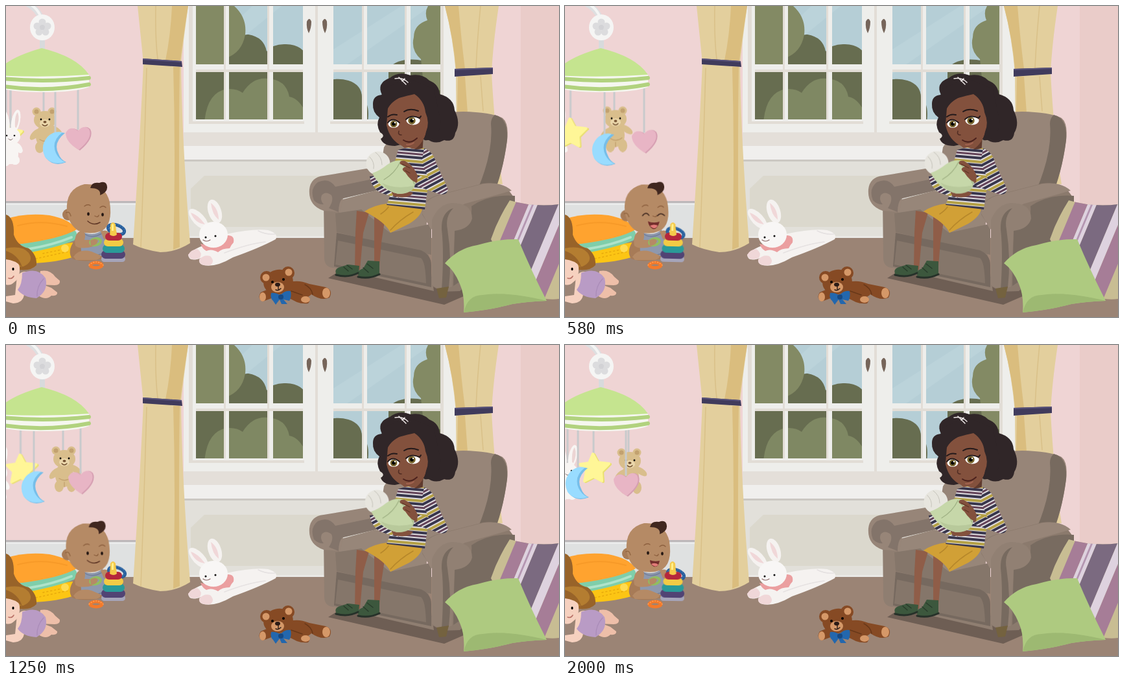
These frames come from a looping animation (853 px wide and 480 px high, 2.08 s). An HTML page:

```html
<!DOCTYPE html>
<html lang="en">
<head>
<meta charset="utf-8">
<title>Nursery</title>
<style>
html, body { margin: 0; width: 100%; height: 100%; overflow: hidden; background: #efd4d4; }
svg { display: block; width: 100vw; height: 100vh; }
.line { fill: none; stroke-linecap: round; stroke-linejoin: round; }
.string { stroke: #c8cacc; stroke-width: 3; }

/* 25 poses per loop: each span is stepped, not smooth */
.move { animation: 2080ms linear -4ms infinite; }
.show { animation: 2080ms step-end -4ms infinite; }

.heart { animation-name: heart; }
.bear { animation-name: bear; }
.moon { animation-name: moon; }
.star { animation-name: star; }
.bunny { animation-name: bunny; }
.ring { animation-name: ring; }
.stack { animation-name: stack; transform-origin: 166px 392px; }
.head { animation-name: head; transform-origin: 124px 350px; }
.bundle { animation-name: bundle; }
.smile { animation-name: smile; }
.open { animation-name: open; }
.laugh { animation-name: laugh; }
.near { animation-name: near; }

@keyframes heart {
  0% { transform: translate(112px, 204px); animation-timing-function: steps(4); }
  16% { transform: translate(118px, 207px); animation-timing-function: steps(6); }
  40% { transform: translate(128px, 210px); animation-timing-function: steps(3); }
  52% { transform: translate(121px, 211px); animation-timing-function: steps(4); }
  68% { transform: translate(111px, 212px); animation-timing-function: steps(3); }
  80% { transform: translate(104px, 213px); animation-timing-function: steps(4); }
  96%, 100% { transform: translate(95px, 215px); }
}
@keyframes bear {
  0% { transform: translate(60px, 176px); animation-timing-function: steps(4); }
  16% { transform: translate(71px, 175px); animation-timing-function: steps(6); }
  40% { transform: translate(85px, 174px); animation-timing-function: steps(3); }
  52% { transform: translate(88px, 175px); animation-timing-function: steps(4); }
  68% { transform: translate(92px, 177px); animation-timing-function: steps(3); }
  80% { transform: translate(96px, 178px); animation-timing-function: steps(4); }
  96%, 100% { transform: translate(100px, 179px); }
}
@keyframes moon {
  0% { transform: translate(74px, 218px); animation-timing-function: steps(4); }
  16% { transform: translate(66px, 220px); animation-timing-function: steps(6); }
  40% { transform: translate(52px, 221px); animation-timing-function: steps(3); }
  52% { transform: translate(46px, 220px); animation-timing-function: steps(4); }
  68% { transform: translate(36px, 217px); animation-timing-function: steps(3); }
  80% { transform: translate(29px, 215px); animation-timing-function: steps(4); }
  96%, 100% { transform: translate(18px, 212px); }
}
@keyframes star {
  0% { transform: translate(2px, 199px); animation-timing-function: steps(4); }
  16% { transform: translate(7px, 198px); animation-timing-function: steps(6); }
  40% { transform: translate(14px, 192px); animation-timing-function: steps(3); }
  52% { transform: translate(20px, 191px); animation-timing-function: steps(4); }
  68% { transform: translate(29px, 190px); animation-timing-function: steps(3); }
  80% { transform: translate(37px, 189px); animation-timing-function: steps(4); }
  96%, 100% { transform: translate(46px, 189px); }
}
@keyframes bunny {
  0% { transform: translate(7px, 201px); animation-timing-function: steps(4); }
  16% { transform: translate(-1px, 201px); animation-timing-function: steps(6); }
  40% { transform: translate(-28px, 199px); animation-timing-function: steps(3); }
  52% { transform: translate(-17px, 198px); animation-timing-function: steps(4); }
  68% { transform: translate(-9px, 197px); animation-timing-function: steps(3); }
  80% { transform: translate(-4px, 197px); animation-timing-function: steps(4); }
  96%, 100% { transform: translate(4px, 195px); }
}
@keyframes ring {
  0% { transform: translate(170px, 345px); animation-timing-function: steps(4); }
  16% { transform: translate(170px, 348px); animation-timing-function: steps(6); }
  40%, 52% { transform: translate(171px, 353px); animation-timing-function: steps(4); }
  68% { transform: translate(171px, 348px); animation-timing-function: steps(3); }
  80% { transform: translate(167px, 330px); animation-timing-function: steps(4); }
  96%, 100% { transform: translate(171px, 354px); }
}
@keyframes stack {
  0% { transform: none; animation-timing-function: steps(4); }
  16% { transform: rotate(6deg); animation-timing-function: steps(4); }
  32%, 88% { transform: none; animation-timing-function: steps(2); }
  96%, 100% { transform: rotate(1deg); }
}
@keyframes head {
  0%, 16% { transform: none; animation-timing-function: steps(6); }
  40%, 52% { transform: translate(-1px, 1px) rotate(-4deg); animation-timing-function: steps(4); }
  68% { transform: translate(1px, 0); animation-timing-function: steps(3); }
  80% { transform: translate(-1px, 0); animation-timing-function: steps(4); }
  96%, 100% { transform: translate(1px, 0); }
}
@keyframes bundle {
  0% { transform: none; animation-timing-function: steps(17); }
  68%, 100% { transform: translate(-2px, -1px); }
}
@keyframes smile { 0%, 60% { visibility: visible; } 12%, 88%, 100% { visibility: hidden; } }
@keyframes open { 0%, 24% { visibility: hidden; } 12%, 88%, 100% { visibility: visible; } }
@keyframes laugh { 0%, 60%, 100% { visibility: hidden; } 24% { visibility: visible; } }
@keyframes near { 0% { visibility: visible; } 12%, 100% { visibility: hidden; } }
</style>
</head>
<body>
<svg viewBox="0 0 853 480" preserveAspectRatio="none">
<defs>
  <clipPath id="panes"><path d="M293 0h43v90h-43zM344 0h59v90h-59zM412 0h46v90h-46zM293 102h43v73h-43zM344 102h59v73h-59zM412 102h46v73h-46zM505 0h44v90h-44zM557 0h58v90h-58zM624 0h46v90h-46zM505 102h44v73h-44zM557 102h58v73h-58zM624 102h46v73h-46z"/></clipPath>
  <clipPath id="cushion"><path d="M777 300Q815 311 853 306V452Q830 456 790 440L748 360Q758 330 777 300Z"/></clipPath>
  <pattern id="knit" width="40" height="22" patternUnits="userSpaceOnUse" patternTransform="rotate(5)">
    <path fill="#e0dde0" d="M0 0h40v22H0z"/>
    <path fill="#38364c" d="M0 0h40v4H0zM0 11h40v4H0z"/>
    <path fill="#b5a145" d="M0 6h40v4H0z"/>
    <path fill="#634358" d="M0 17h40v3H0z"/>
  </pattern>
  <pattern id="sleeve" href="#knit" patternTransform="rotate(-28)"/>
  <path id="points" stroke-width="4" stroke-linejoin="round" d="M-3-21L4-8L22-6L10 6L11 21L-2 14L-16 21L-13 5L-23-5L-9-7Z"/>
  <g id="rabbit">
    <path class="string" d="M0-78V-12"/>
    <g fill="#f8f5f3">
      <ellipse cx="-8" cy="-23" rx="6" ry="18" transform="rotate(-10 -8 -23)"/>
      <ellipse cx="8" cy="-23" rx="6.5" ry="18" transform="rotate(12 8 -23)"/>
      <ellipse cy="26" rx="12" ry="17"/>
      <ellipse cx="-7" cy="38" rx="6" ry="8"/><ellipse cx="7" cy="37" rx="7" ry="7"/>
      <ellipse cx="12" cy="18" rx="5" ry="9" transform="rotate(-35 12 18)"/>
      <ellipse rx="15" ry="13"/>
    </g>
    <path fill="#ecd5d4" d="M7-14Q6-32 11-37Q15-26 9-13Z"/>
    <circle cx="-6" cy="-1" r="1.3"/><circle cx="6" cy="-1" r="1.3"/>
    <path class="line" stroke="#806a68" d="M-3 4Q0 8 3 4"/>
  </g>
</defs>

<!-- walls and floor -->
<path fill="#efd4d4" d="M0 0h853v480H0z"/>
<path fill="#eaccc9" d="M794 0h59v330h-59z"/>
<path fill="#dfe1e1" d="M0 303h280v56H0z"/>
<path fill="#eceded" d="M0 305h200v2H0z"/>
<path fill="#bdb8ba" d="M0 301h200v3H0z"/>
<path fill="#e2e0da" d="M274 238h330v122H274z"/>
<path fill="#dbd8cd" d="M306 262H490V341H302L285 328V282Z"/>
<path fill="#9b8475" d="M0 358h853v122H0z"/>
<path fill="#eae8e5" d="M277 355h216v3H277z"/>

<!-- window -->
<path fill="#eeeeeb" d="M274 0h432v238H274z"/>
<path fill="#e2ddd6" d="M282 0h6v182h-6zM336 0h3v175h-3zM403 0h3v175h-3zM477 0h4v195h-4zM549 0h3v175h-3zM615 0h3v175h-3zM670 0h5v175h-5zM293 98h165v4H293zM505 98h165v4H505zM288 178h172v4H288zM500 178h180v4H500z"/>
<path fill="#e4dfd9" d="M274 195h432v21H274z"/>
<path fill="#f0efed" d="M274 216h330v21H274z"/>
<path fill="#cbc8c2" d="M274 237h320v3H274z"/>
<g clip-path="url(#panes)">
  <path fill="#b5ced6" d="M290 0h385v180H290z"/>
  <path fill="#bbd3da" d="M380 0h45L345 65V33ZM505 67L610 0h45L505 105Z"/>
  <path fill="#676d50" d="M290 85H340Q348 43 374 44Q398 48 402 70Q412 58 432 59Q460 60 465 82V180H290Z"/>
  <path fill="#838a64" d="M290 0H352Q372 18 369 44Q364 72 340 80V96H290Z"/>
  <path fill="#7f8863" d="M306 180Q310 133 341 128Q356 127 365 134Q380 110 403 112Q432 113 437 140Q450 142 460 160V180Z"/>
  <path fill="#676d50" d="M500 114Q514 111 528 115Q550 122 549 143Q562 149 558 180H500ZM590 96Q605 80 635 83L675 90V180H590Z"/>
  <path fill="#838a64" d="M675 0H651Q645 10 650 22Q629 29 629 48Q624 68 640 82L645 130H675Z"/>
</g>
<path fill="#76655a" d="M464 24Q468 16 471 24Q471 34 467 42Q463 34 464 24ZM488 24Q492 16 495 24Q496 34 492 42Q488 34 488 24Z"/>

<!-- curtains -->
<path fill="#e3cf9d" d="M203 0H281Q274 50 270 88Q271 200 284 366Q262 380 238 380Q212 376 196 368Q207 200 212 88Z"/>
<path fill="#dabd7e" d="M256 0H281Q273 50 269 84H246Q254 45 256 0ZM258 94H268Q266 220 268 372L258 376Q262 230 258 94Z"/>
<path class="line" stroke="#d9c088" stroke-width="1.5" d="M231 0Q230 50 234 82M217 96Q213 240 208 372"/>
<path fill="#403b5c" d="M211 81L271 85L272 94L211 90Z"/><path fill="#58527a" d="M211 81L271 85V87L211 83Z"/>
<path fill="#e3cf9d" d="M677 0H760Q751 60 749 104Q755 210 766 275H700Q694 200 694 104Q690 50 677 0Z"/>
<path fill="#dabd7e" d="M677 0H698Q702 50 708 97H694Q690 50 677 0ZM697 109H708L712 165H696Z"/>
<path class="line" stroke="#d9c088" stroke-width="1.5" d="M732 0Q727 50 725 96M732 109L736 162"/>
<path fill="#403b5c" d="M692 97L751 95V105L692 109Z"/><path fill="#58527a" d="M692 97L751 95V97L692 99Z"/>

<!-- armchair -->
<path fill="#6e5e54" d="M497 420L530 399L700 425L722 441L676 461Z"/>
<path fill="#978578" d="M570 300L583 218L604 188Q650 163 705 163Q750 164 766 173Q776 181 773 207Q768 246 757 275L690 310Z"/>
<path fill="#776a5f" d="M754 168Q775 173 773 207Q768 246 757 278L728 282Q752 225 748 182Q748 173 754 168Z"/>
<path fill="#8f7e71" d="M490 302H640L660 440L506 404Q492 404 491 390Z"/>
<path fill="#978679" d="M514 300L570 285L652 305L648 345L600 352L514 320Z"/>
<path fill="#85766a" d="M508 320L548 314L592 350L656 336V384L510 349Z"/>
<path fill="#76695f" d="M510 350L640 377Q656 384 656 400V434L506 402Z"/>
<path fill="#85766a" d="M512 362L640 389Q647 394 648 428L508 399Z"/>
<path fill="#978578" d="M490 262L556 251L585 263L583 282L520 297L516 318L490 316Q466 308 468 283Q470 264 490 262Z"/>
<path fill="#83746a" d="M475 300Q468 282 481 272Q498 264 508 279L580 264L583 282L519 297Q513 303 513 318L498 312Q506 300 502 292Q493 285 487 292Q484 300 490 306Q482 307 475 300Z"/>
<path fill="#8b7a6d" d="M642 322Q640 300 665 292L735 274Q773 270 785 300V365L700 440L672 441L657 432V345Z"/>
<path fill="#978578" d="M642 320Q643 299 668 292L738 274Q765 271 780 285L712 304Q694 308 688 330Q670 345 655 344Z"/>
<path fill="#786b60" d="M692 345Q721 338 718 309Q745 290 785 293V370L690 432Z"/>
<path fill="#918073" d="M657 330Q668 305 688 304Q719 304 719 328Q715 344 692 347L688 433L671 439L657 431Z"/>
<path fill="#776a5f" d="M672 438Q676 380 672 345Q671 318 690 312Q677 325 681 345Q688 390 683 435Z"/>
<path fill="#74623f" d="M664 436L683 433L679 450L668 451Z"/>

<!-- cushions on the right -->
<g clip-path="url(#cushion)">
  <path fill="#c8bd93" d="M740 290h120v170H740z"/>
  <path fill="#a67d97" d="M792 290h21L742 460H721Z"/>
  <path fill="#ded2df" d="M813 290h14L756 460H742Z"/>
  <path fill="#b496b1" d="M818 290h3L750 460H747Z"/>
  <path fill="#7b6a80" d="M827 290h32L788 460H756Z"/>
  <path fill="#ded2df" d="M859 290h14L802 460H788Z"/>
  <path fill="#a67d97" d="M873 290h25L827 460H802Z"/>
</g>
<path fill="#aeca80" d="M677 397Q697 374 727 369Q760 359 790 360Q810 408 834 455Q805 456 781 460Q748 469 706 473Q708 447 700 429Q691 407 677 397Z"/>
<path fill="#9db972" d="M706 473Q712 446 735 446Q770 440 834 455Q805 456 781 460Q748 469 706 473Z"/>

<!-- mother -->
<path fill="#302628" d="M566 151Q566 138 580 137Q571 119 592 111Q606 100 624 107Q642 104 653 115Q668 121 669 136Q691 142 692 161Q702 181 693 196Q691 211 676 207Q662 215 649 205L600 216Q582 216 578 205Q586 200 577 195Q570 182 576 172Q565 164 566 151Z"/>
<path fill="#5f3a2d" d="M621 205L644 198L642 232L619 226Z"/>
<path fill="#83513d" d="M589 157Q602 138 631 135Q651 153 652 181Q647 208 633 219Q622 227 611 216Q592 207 587 184Z"/>
<path fill="#302628" d="M585 170Q589 150 606 142Q620 138 630 136Q645 146 647 164Q654 180 648 194L645 207Q666 210 671 180L660 128L620 111L582 128L574 156Z"/>
<path class="line" stroke="#eee8e8" stroke-width="1.5" d="M600 112Q613 110 620 118M606 110L617 121M611 116L615 112"/>
<ellipse cx="598" cy="182" rx="8.5" ry="6" fill="#fff"/><ellipse cx="628" cy="177" rx="10.5" ry="6.5" fill="#fff"/>
<circle cx="598" cy="182" r="5.3" fill="#77652d"/><circle cx="626" cy="177" r="5.7" fill="#77652d"/>
<circle cx="598" cy="182" r="2.8"/><circle cx="626" cy="177" r="2.8"/>
<circle cx="600" cy="180" r="1.2" fill="#fff"/><circle cx="628" cy="175" r="1.2" fill="#fff"/>
<path class="line" stroke="#241a1b" stroke-width="2" d="M589 180Q596 171 607 180M617 175Q625 167 638 173L640 170M589 171Q595 166 603 168M614 163Q623 157 636 162"/>
<path class="line" stroke="#4f2b22" stroke-width="1.5" d="M606 193Q604 199 610 199"/>
<path class="line" stroke="#4b211d" stroke-width="2" d="M613 207Q623 214 634 204"/>
<path class="line" stroke="#a26350" stroke-width="2" d="M618 214Q624 215 629 211"/>
<g fill="#8f5d48">
  <path d="M541 316L560 319L551 350L546 407H538L539 350Z"/><path d="M568 322L584 332L579 365L576 402H568Z"/>
</g>
<path fill="#d1a036" d="M553 317Q568 307 588 305L642 313Q640 325 622 336Q604 345 593 350Q586 334 553 317Z"/>
<path class="line" stroke="#b6872a" stroke-width="1.5" d="M628 318Q607 330 593 346M590 310Q586 316 578 321"/>
<g fill="#3c573d">
  <path d="M528 399L545 401L544 411Q526 420 510 415Q505 406 515 403Z"/>
  <path d="M558 393L576 394V414Q560 422 545 418Q538 410 551 405Z"/>
</g>
<path class="line" stroke="#263129" stroke-width="3" d="M509 415Q528 420 543 412M543 418Q560 422 576 414"/>
<path class="line" stroke="#283b2a" stroke-width="1.5" d="M526 400L534 406M521 403L528 409M557 398L566 405M551 404L559 411"/>
<path fill="url(#knit)" d="M605 222L621 218Q632 224 644 219L660 235Q652 266 646 314L587 307Q600 278 597 250Z"/>
<path fill="url(#sleeve)" d="M645 220Q659 224 664 244L682 283Q680 293 668 290L631 277L635 261L652 267L641 240ZM561 263Q563 279 577 288L606 297V283L574 262Z"/>
<path fill="#83513d" d="M594 286Q612 283 628 288Q624 298 598 294Z"/>
<g class="move bundle">
  <circle cx="574" cy="243" r="18.5" fill="#e7e5de"/>
  <path class="line" stroke="#c5c3ba" d="M561 233Q569 241 567 251M570 226Q580 233 580 245"/>
  <path fill="#c6d7a9" d="M565 258Q577 254 588 245Q603 234 619 241Q633 251 632 272Q627 290 605 290Q578 284 565 258Z"/>
  <path fill="#b8c99b" d="M580 273Q600 284 631 277Q626 290 605 290Q590 287 580 273Z"/>
  <path class="line" stroke="#9fb184" stroke-width="1.3" d="M608 241Q600 258 583 268M609 242Q622 255 630 275"/>
</g>
<path fill="#83513d" d="M635 262Q629 246 615 239Q606 238 608 244L617 248Q607 251 616 257Q624 270 634 273Z"/>
<path class="line" stroke="#55301f" d="M611 244L623 250M616 254L623 258"/>

<!-- rabbit rug -->
<g fill="#f5f2f0">
  <ellipse cx="297" cy="329" rx="9" ry="20" transform="rotate(-43 297 329)"/>
  <ellipse cx="322" cy="317" rx="10" ry="19" transform="rotate(-18 322 317)"/>
  <path d="M340 352Q382 343 404 346Q421 351 416 360Q392 373 350 388Q323 404 305 400Q294 397 301 389Q282 396 281 384Q290 374 307 369Z"/>
</g>
<path fill="#f0d7d8" d="M285 319Q296 322 307 337Q291 335 285 319ZM316 304Q328 313 328 330Q318 322 316 304ZM281 384Q285 376 295 375Q304 381 299 389Q284 395 281 384ZM298 391Q306 383 315 386Q323 394 315 400Q297 402 298 391Z"/>
<path class="line" stroke="#e5e1e1" stroke-width="1.5" d="M337 381Q374 367 400 364M389 347Q400 353 415 352"/>
<path fill="#eb9fa0" d="M300 367Q322 374 342 354Q353 354 351 365Q347 369 345 374Q333 374 327 380Q317 374 309 378Q303 375 300 367Z"/>
<ellipse cx="320" cy="353" rx="22" ry="20" fill="#f8f6f5"/>
<circle cx="308" cy="357" r="1.5"/><circle cx="323" cy="355" r="1.5"/>
<path class="line" stroke="#8a6868" stroke-width="1.2" d="M304 361Q309 365 315 361"/>

<!-- teddy on the floor -->
<g fill="#864a24">
  <path d="M431 430Q445 420 468 429L493 434Q505 438 499 450Q487 456 471 445Q463 454 435 452Z"/>
  <path d="M440 440L464 447Q472 452 466 459Q450 461 435 449ZM409 435L393 442Q387 451 396 456L418 448Z"/>
  <circle cx="402" cy="419" r="10"/><circle cx="435" cy="412" r="10"/>
  <ellipse cx="420" cy="426" rx="23" ry="19" transform="rotate(-12 420 426)"/>
</g>
<g fill="#d59868">
  <circle cx="401" cy="419" r="5.5"/><circle cx="436" cy="411" r="5.5"/>
  <ellipse cx="419" cy="434" rx="10" ry="8"/>
  <ellipse cx="396" cy="449" rx="5" ry="7"/><ellipse cx="462" cy="453" rx="7" ry="5"/><ellipse cx="494" cy="443" rx="6" ry="8"/>
</g>
<path class="line" stroke="#683819" stroke-width="1.5" d="M440 440L457 446M461 430Q471 435 473 445"/>
<circle cx="411" cy="426" r="2"/><circle cx="428" cy="422" r="2"/>
<ellipse cx="419" cy="430" rx="4" ry="3" fill="#2b1b16"/>
<path class="line" stroke="#2b1b16" stroke-width="1.4" d="M420 432V437M416 438Q420 440 424 436"/>
<path fill="#2367ad" d="M409 443Q417 442 423 447Q430 438 439 440Q441 449 437 455L428 453L434 460H425L422 453L416 461L412 455Q407 451 409 443Z"/>
<circle cx="424" cy="449" r="4" fill="#174a84"/>

<!-- cushions and doll on the left -->
<path fill="#fcc514" d="M10 378Q70 370 103 365L102 388Q65 399 10 397Z"/>
<path class="line" stroke="#e7a90c" stroke-width="1.5" stroke-dasharray="2 4" d="M46 390L96 379M57 382L91 375"/>
<circle cx="91" cy="374" r="6" fill="#ffdb51"/>
<path fill="#7fceaa" d="M20 362Q77 356 104 345Q114 351 105 362Q75 374 27 382Z"/>
<path class="line" stroke="#afe3ca" stroke-width="4" d="M35 375Q72 369 101 357"/>
<path fill="#ffa32f" d="M0 329Q28 319 67 323Q99 329 109 345Q85 359 25 367L0 368Z"/>
<path class="line" stroke="#f79a28" stroke-width="2" d="M18 339Q54 329 94 340"/>
<path fill="#986329" d="M0 322Q13 326 12 353Q18 371 35 374Q48 384 47 400Q34 414 0 402Z"/>
<path fill="#b47d31" d="M0 374Q25 369 35 381Q44 394 27 402L0 405Z"/>
<path fill="#eebfa9" d="M53 409Q68 406 76 418L83 424Q84 431 75 431L50 430ZM52 428L70 435L79 442Q80 448 70 447Q62 455 50 447Z"/>
<path fill="#f6d1bf" d="M17 417Q25 406 38 412L28 443Q28 458 11 459L0 456V448L14 446Z"/>
<path fill="#b99bc5" d="M25 412Q49 402 61 420Q66 440 47 451Q27 450 18 438Q25 430 25 412Z"/>
<path class="line" stroke="#a98bb7" stroke-width="1.2" d="M58 421Q47 433 48 448"/>
<path fill="#f6d1bf" d="M0 389Q18 389 21 403Q22 420 13 426Q7 432 0 430Z"/>
<path fill="#986329" d="M0 378Q19 384 25 403Q14 392 0 391Z"/>
<ellipse cx="11" cy="406" rx="1.6" ry="2.2"/>
<path class="line" stroke="#b86f65" stroke-width="1.5" d="M4 420Q9 422 12 417"/>

<!-- child -->
<path fill="#a77b57" d="M105 363Q94 378 102 390Q122 397 148 390Q151 377 134 372Z"/>
<path fill="#8e98ad" d="M114 347Q136 358 149 345Q157 365 150 385Q130 391 116 379Z"/>
<path class="line" stroke="#737f98" stroke-width="1.5" d="M119 350Q131 361 148 351M128 382Q137 387 149 382"/>
<path fill="#b58a65" d="M104 387Q113 374 132 379L146 385Q146 393 132 392L108 392Z"/>
<path fill="#b58a65" d="M115 347Q104 352 107 370Q114 377 139 370L141 361L121 361Q123 354 121 349ZM146 348Q154 344 160 350Q160 359 151 360Z"/>
<ellipse cx="138" cy="364" rx="8" ry="5" class="line" stroke="#91bd60" stroke-width="4" transform="rotate(-12 138 364)"/>
<path fill="#b58a65" d="M130 362Q138 357 142 362Q140 370 131 370Z"/>
<g class="move head">
  <circle cx="96" cy="322" r="9" fill="#a77b57"/>
  <path fill="#b58a65" d="M94 318Q91 282 121 275Q153 273 160 303Q165 337 148 347Q130 354 112 347Q98 339 94 318Z"/>
  <path class="line" stroke="#926742" stroke-width="1.5" d="M93 319Q98 316 100 324"/>
  <path fill="#40271f" d="M130 281Q132 271 144 273Q155 269 156 279Q157 287 145 292Q147 281 130 281Z"/>
  <path class="line" stroke="#8d603f" stroke-width="1.4" d="M137 324Q142 327 143 323M121 309Q126 305 130 308M145 311Q150 307 154 311"/>
  <g class="show smile">
    <ellipse cx="127" cy="321" rx="1.9" ry="2.7" fill="#241713"/><ellipse cx="149" cy="322" rx="1.9" ry="2.7" fill="#241713"/>
    <path class="line" stroke="#603827" stroke-width="1.5" d="M126 332Q135 340 145 334"/>
  </g>
  <g class="show open">
    <ellipse cx="127" cy="321" rx="1.9" ry="2.7" fill="#241713"/><ellipse cx="149" cy="322" rx="1.9" ry="2.7" fill="#241713"/>
    <path fill="#732e2c" d="M130 332Q137 335 145 333Q143 344 136 342Q130 339 130 332Z"/>
    <path fill="#e27b78" d="M132 338Q138 335 143 339Q139 345 132 338Z"/>
  </g>
  <g class="show laugh">
    <path class="line" stroke="#38221b" stroke-width="1.5" d="M121 323Q127 316 131 323M144 324Q149 318 155 324"/>
    <path fill="#732e2c" d="M129 332Q137 336 147 333Q143 346 136 344Q130 340 129 332Z"/>
    <path fill="#e27b78" d="M132 339Q138 336 144 339Q139 347 132 339Z"/>
  </g>
</g>

<!-- ring tower -->
<ellipse cx="139" cy="400" rx="9" ry="4" class="line" stroke="#f37a2b" stroke-width="5"/>
<path class="line" stroke="#ffac65" stroke-width="1.2" stroke-dasharray="1 3" d="M128 400Q139 390 150 400"/>
<g class="move ring">
  <ellipse rx="13" ry="7" class="line" stroke="#275c99" stroke-width="5" transform="rotate(18)"/>
  <ellipse cy="-1" rx="13" ry="7" class="line" stroke="#3c79b7" stroke-width="1.5" stroke-dasharray="1 3" transform="rotate(18)"/>
</g>
<g class="move stack">
  <path fill="#f5ca4b" d="M161 337Q165 331 169 337L171 356H160Z"/>
  <path fill="#fff08c" d="M163 338Q165 334 166 338V353H163Z"/>
  <rect x="147" y="386" width="37" height="9" rx="4.5" fill="#a6a5ba"/>
  <rect x="147" y="377" width="37" height="13" rx="6.5" fill="#514374"/>
  <rect x="149" y="368" width="34" height="13" rx="6.5" fill="#2a9a98"/>
  <rect x="151" y="359" width="30" height="12" rx="6" fill="#f2cb45"/>
  <rect x="153" y="350" width="26" height="12" rx="6" fill="#b5273c"/>
  <path fill="#f5ca4b" d="M161 347H170L171 353Q166 357 160 353Z"/>
</g>

<!-- hanging mobile -->
<g class="move bunny"><use href="#rabbit"/></g>
<g class="move bear">
  <path class="string" d="M-2-60V-11"/>
  <g fill="#d9be8c">
    <circle cx="-13" cy="-13" r="6.5"/><circle cx="11" cy="-13" r="6.5"/>
    <ellipse cy="25" rx="14" ry="18"/>
    <ellipse cx="-15" cy="22" rx="5" ry="11" transform="rotate(43 -15 22)"/>
    <ellipse cx="17" cy="16" rx="5" ry="11" transform="rotate(-55 17 16)"/>
    <ellipse cx="-8" cy="42" rx="7" ry="9"/><ellipse cx="11" cy="41" rx="7" ry="10"/>
    <ellipse rx="17" ry="14"/>
  </g>
  <circle cx="-13" cy="-13" r="3.5" fill="#c2a16f"/><circle cx="11" cy="-13" r="3.5" fill="#c2a16f"/>
  <ellipse cy="5" rx="8" ry="6" fill="#ead6aa"/>
  <circle cx="-6" cy="-1" r="1.4"/><circle cx="7" cy="-1" r="1.4"/><ellipse cy="3" rx="2.5" ry="1.8" fill="#6d4a2b"/>
  <path class="line" stroke="#6d4a2b" stroke-width="1.3" d="M-4 7Q0 11 4 7"/>
  <path class="line" stroke="#c2a16f" stroke-width="1.3" d="M-8 30Q1 36 10 29M0 36V43"/>
</g>
<g class="move star">
  <path class="string" d="M-2-72V-20"/>
  <use href="#points" x="2" y="1" fill="#e9df70" stroke="#e9df70"/>
  <use href="#points" fill="#fff697" stroke="#fff697"/>
</g>
<g class="move moon">
  <path class="string" d="M2-92V-20"/>
  <path fill="#76bee9" d="M17-22Q-2-7 7 10Q10 19 19 23Q0 31-12 17Q-21 0-8-16Q3-25 17-22Z"/>
  <path fill="#99dcff" d="M13-23Q-5-9 3 9Q7 18 17 23Q-3 29-14 15Q-22-2-10-16Q0-26 13-23Z"/>
</g>
<g class="move heart">
  <path class="string" d="M-1-86V-13"/>
  <path fill="#d69fb2" d="M1-11Q10-22 18-14Q25 0 2 19Q-18 7-18-8Q-11-20 1-11Z"/>
  <path fill="#e8b5c5" d="M-1-11Q8-22 16-14Q23-1 0 18Q-20 6-20-8Q-13-21-1-11Z"/>
</g>
<g class="show near"><g class="move bunny"><use href="#rabbit"/></g></g>
<path class="line" stroke="#dedfe1" stroke-width="9" d="M22-8Q48 0 55 21"/>
<path class="line" stroke="#f4f4f3" stroke-width="4" d="M22-10Q48-1 54 18"/>
<path fill="#d8dadc" d="M52 46h8v22h-8z"/>
<ellipse cx="56" cy="33" rx="19" ry="20" fill="#f5f5f4"/>
<g fill="#dcdcde"><circle cx="56" cy="25" r="5.5"/><circle cx="48" cy="31" r="5.5"/><circle cx="64" cy="31" r="5.5"/><circle cx="51" cy="40" r="5.5"/><circle cx="61" cy="40" r="5.5"/></g>
<circle cx="56" cy="33" r="4" fill="#d2d2d5"/>
<path fill="#f5f7ef" d="M-17 106H128V125Q108 133 56 133Q4 133-17 124Z"/>
<path class="line" stroke="#b1d27e" stroke-width="6" d="M-16 111Q56 119 128 111"/>
<path class="line" stroke="#b1d27e" stroke-width="6" d="M-16 122Q56 135 128 121"/>
<path fill="#c5e48f" d="M-17 107Q-5 82 55 65Q109 78 128 106Q56 111-17 107Z"/>
</svg>
</body>
</html>
```
